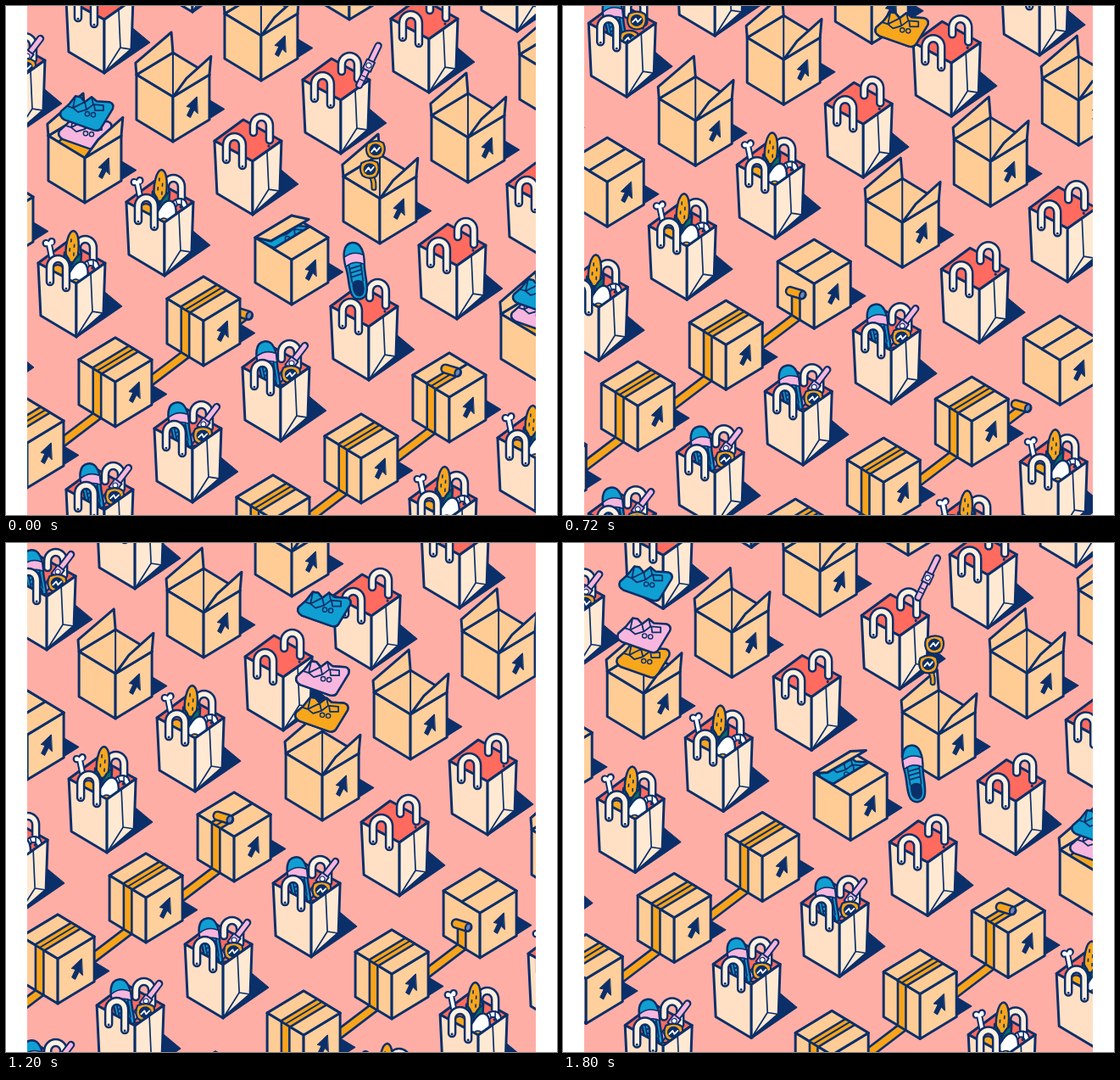
These frames come from a looping animation (650 by 600 pixels, 1840 ms). An HTML page with a canvas:

```html
<!DOCTYPE html>
<html>
<head>
<meta charset="utf-8">
<style>
html,body{margin:0;width:100%;height:100%;overflow:hidden;background:#fff}
canvas{display:block}
</style>
</head>
<body>
<canvas id="c" width="650" height="600"></canvas>
<script>
const g = document.getElementById('c').getContext('2d');
const T = 1840, STEP = [104, -72];
const NAVY = '#0b2f69', PINK = '#f7b6dd', BLUE = '#109fd2', ORANGE = '#f8a61c',
  TAPE = '#f9a31a', TAN = '#ffcc96', CREAM = '#ffe0c4', PALE = '#ffe9d3', RED = '#ff6b5e', GREEN = '#0c6e62';

// Rows along the belt: position at time 0 of item 0 and the time its goods land.
const ROWS = [
  {kind: 'wear', x: 116, y: 79, off: 580},
  {kind: 'box', x: 93, y: 232, off: 0},
  {kind: 'food', x: 291, y: 246, off: 0},
  {kind: 'box', x: 441, y: 280, off: 1280},
  {kind: 'wear', x: 428, y: 441, off: 0},
  {kind: 'box', x: 627, y: 442, off: -43},
  {kind: 'food', x: 625, y: 596, off: -T}
];

function track(keys, t) {
  if (t <= keys[0][0]) return keys[0][1];
  for (let i = 1; i < keys.length; i++) {
    const [t1, v1] = keys[i], [t0, v0] = keys[i - 1];
    if (t < t1) return v0 + (v1 - v0) * (t - t0) / (t1 - t0);
  }
  return keys[keys.length - 1][1];
}

function trace(pts) {
  g.beginPath();
  pts.forEach(p => g.lineTo(p[0], p[1]));
  g.closePath();
}
function poly(pts, fill, w = 3) {
  trace(pts);
  g.fillStyle = fill;
  g.fill();
  if (w) { g.lineWidth = w; g.strokeStyle = NAVY; g.stroke(); }
}
function shape(d, fill, w = 0, color = NAVY) {
  const p = new Path2D(d);
  if (fill) { g.fillStyle = fill; g.fill(p); }
  if (w) { g.lineWidth = w; g.strokeStyle = color; g.stroke(p); }
}
function oval(x, y, rx, ry, fill, w = 0) {
  g.beginPath();
  g.ellipse(x, y, rx, ry, 0, 0, 7);
  if (fill) { g.fillStyle = fill; g.fill(); }
  if (w) { g.lineWidth = w; g.strokeStyle = NAVY; g.stroke(); }
}
function at(x, y, turn, draw) {
  g.save();
  g.translate(x, y);
  g.rotate(turn);
  draw();
  g.restore();
}
const add = (p, q, k = 1) => [p[0] + q[0] * k, p[1] + q[1] * k];
const mix = (p, q, k) => [p[0] + (q[0] - p[0]) * k, p[1] + (q[1] - p[1]) * k];

// ---- goods ----
function shirt(color) {
  shape('M-30-2L-21-10L-13-20L-7-19L-2-13L6-19L12-14L27-13Q33-11 31-5L17 18Q14 22 8 20L-26 8Q-33 4-30-2Z', color, 2.5);
  shape('M-13-20L-16-6L-2-13M-16-6L-22-8M-2-13L0-4L8-10L6-19M-16-6L-10-1L0-4M9-10L20-9L20-3L10-3Z', null, 1.8);
  oval(1, 1, 2.6, 2.6, null, 1.4);
  oval(8, 2, 2.6, 2.6, null, 1.4);
}
function shoe() {
  shape('M0-34C11-34 13-20 11-6C10 4 12 14 10 24C8 36-7 36-9 24C-11 14-9 4-11-6C-13-20-11-34 0-34Z', BLUE, 2.5);
  shape('M-11.5-18Q0-25 11.5-18L11-7Q0-14-11-7Z', PINK, 1.6);
  shape('M-6 13Q0 8 7 13Q9 29 1 30Q-8 29-6 13Z', NAVY);
  shape('M-6-4L6-6M-6 1L6-1M-6 6L6 4M-7-8L-6 12M7-8L7 12', null, 1.8);
}
function glasses() {
  shape('M-6 14Q2 22 1 33', null, 7);
  shape('M-6 14Q2 22 1 33', null, 3, TAPE);
  for (const [x, y] of [[3, -12], [-4, 11]]) at(x, y, -0.1, () => {
    shape('M-9-8Q2-13 10-7Q13 2 7 9Q-2 13-9 7Q-13 0-9-8Z', TAPE, 2.2);
    oval(0, 0, 7.5, 7, NAVY);
    shape('M-5 2L-1-2L1 2L5-2', null, 1.8, '#fff');
  });
}
function watch() {
  shape('M0-26L0 26', null, 9);
  shape('M0-25.5L0 25.5', null, 5, PINK);
  shape('M-2 14L2 14M-2 19L2 19', null, 1.4);
  shape('M-5-6L5-6L5 6L-5 6Z', PINK, 2);
  oval(0, 0, 3, 3, '#fff', 1.2);
}
function egg() {
  shape('M0-19C8-19 12-4 12 5C12 14 7 19 0 19C-7 19-12 14-12 5C-12-4-8-19 0-19Z', '#fff', 2.5);
  oval(0, 9, 6.5, 6.5, ORANGE, 1.6);
}
function corn() {
  shape('M-6 10C-10-8-6-26 0-27C7-26 9-8 6 10Z', ORANGE, 2.5);
  shape('M-2-17L-2-14M2-11L2-8M-3-6L-3-3M2-1L2 2', null, 1.6);
  shape('M-9-1Q-3 6 0 14Q4 4 11-2Q12 16 4 27L-4 27Q-11 14-9-1Z', GREEN, 2.5);
  shape('M0 14L0 24', null, 1.6);
}
function bone() {
  const d = 'M0-8L1 12';
  oval(-3.5, -9, 3.5, 3.5, '#fff', 2.4);
  oval(3.5, -10, 3.5, 3.5, '#fff', 2.4);
  shape(d, null, 8);
  shape(d, null, 4, '#fff');
  oval(-3, -9, 2.6, 2.6, '#fff');
  oval(3, -9, 2.6, 2.6, '#fff');
}
function shrimp() {
  shape('M-9 6Q-9-6 2-7Q11-7 11 4L6 6Q5-1 0 0Q-4 2-4 8Z', '#fff', 2);
  shape('M-3-6L-1 0M4-7L4 0M9 5L14 10M9 5L8 11', null, 1.6);
  oval(-6, 4, 1.6, 1.6, RED);
}
const fruit = () => oval(0, 0, 7, 7, ORANGE, 2.2);

// Each: drawing, fall track, x and turn while falling, x and turn at rest.
const GOODS = {
  wear: [
    [watch, [[-250, -540], [-40, -399], [0, -372], [260, -92]], 0, .45, 13, .65],
    [shoe, [[-400, -520], [-40, -168], [0, -129], [60, -84]], -16, -.12, -14, -.16],
    [glasses, [[-300, -620], [-40, -309], [0, -261], [150, -67]], 5, 0, 8, .1]
  ],
  food: [
    [bone, [[350, -330], [580, -102]], -31, -.15, -31, -.15],
    [corn, [[100, -490], [400, -187], [480, -98]], -10, .32, -5, .06],
    [shrimp, [[420, -340], [650, -84]], 16, 0, 16, 0],
    [fruit, [[430, -330], [600, -78]], -22, 0, -22, 0],
    [egg, [[-20, -520], [400, -102], [440, -70]], 0, 0, 2, .3]
  ]
};
const SHIRTS = [
  [ORANGE, -1, [[-880, -340], [-560, -281], [-400, -257], [-317, -225], [-80, -126], [-40, -93], [0, -70], [200, -55]]],
  [PINK, 0, [[-880, -390], [-560, -336], [-400, -302], [-317, -271], [-80, -169], [-40, -123], [0, -83], [200, -62]]],
  [BLUE, 2, [[-880, -420], [-560, -375], [-400, -348], [-317, -321], [-80, -251], [-40, -185], [0, -106], [200, -79]]]
];

// ---- bag ----
const BAG = {l: [-45, -87], f: [0, -63], r: [34, -87], b: [-11, -112], lb: [-42, -25], rb: [32, -28]};
function handle(d) {
  shape(d, null, 10.5);
  shape(d, null, 5.5, '#fff0df');
}
function bag(kind, age) {
  const {l, f, r, b, lb, rb} = BAG;
  poly([l, b, r, f], RED);
  oval(0, -96, 1.5, 1.8, NAVY);
  oval(19, -81, 1.5, 1.8, NAVY);
  handle('M1-97L1-105A9.5 10 0 0 1 20-105L20-88');
  for (const [draw, keys, x0, a0, x1, a1] of GOODS[kind]) {
    if (age < keys[0][0]) continue;
    const end = keys[keys.length - 1][0];
    const k = track([[end - 90, 0], [end, 1]], age);
    at(x0 + (x1 - x0) * k, track(keys, age), a0 + (a1 - a0) * k, draw);
  }
  poly([l, f, [0, 0], lb], CREAM);
  poly([f, r, rb, [0, 0]], PALE);
  shape('M17-75L19-30L0 0M19-30L32-28', null, 1.7);
  handle('M-31-65L-31-82A9.5 10 0 0 1-12-82L-12-58');
  oval(-31, -64, 1.4, 1.4, NAVY);
  oval(-12, -57, 1.4, 1.4, NAVY);
}

// ---- box ----
const A = [43, -26], B = [-43, -26];
const BOX = {l: [-43, -79], f: [0, -53], r: [43, -79], b: [0, -105]};
const PATH = [[-82, 33], [-21.5, -13], [-21.5, -66], [21.5, -92], [22, -39]];
const ROLL = [[520, 0], [560, .4], [763, .6], [960, .87], [1280, 1.47], [1523, 2], [1760, 2.2],
  [1883, 2.55], [2040, 2.68], [2283, 3], [2360, 4]];

function flap(deg, p, q, inward, shiftP, scaleP) {
  const a = deg * Math.PI / 180, open = deg / 95;
  const v = [inward[0] * Math.cos(a), inward[1] * Math.cos(a) - 23 * Math.sin(a)];
  const vp = add(v.map(n => n * (1 + (scaleP - 1) * open)), [shiftP * open, 0]);
  poly([p, add(p, vp), add(q, v), q], TAN);
}
function roll(p) {
  at(p[0], p[1] - 4, .3, () => {
    shape('M-7 0L7 0', null, 12.5);
    shape('M-7 0L7 0', null, 7.5, TAPE);
    oval(8, 0, 3.2, 4.6, '#6f86b5', 2.2);
  });
}
function strip(p, q, w) {
  poly([add(p, B, -w), add(q, B, -w), add(q, B, w), add(p, B, w)], TAPE, 2.6);
}
function box(age) {
  const {l, f, r, b} = BOX;
  const way = track(ROLL, age), seg = Math.min(3, Math.floor(way));
  const spot = mix(PATH[seg], PATH[seg + 1], way - seg);
  if (way > 3 && way < 4) roll(spot);

  const left = track([[220, 95], [400, 68], [560, 20], [680, 0]], age);
  const right = track([[220, 95], [400, 16], [500, 0]], age);
  const backFlap = () => flap(left, l, b, [21.5, 13], 0, .58);
  poly([l, b, r, f], TAN);
  if (age < 400) shape('M0-105L0-56', null, 2);
  if (left > 50) backFlap();
  if (age > -880 && age < 650) {
    g.save();
    if (age > 120) { trace([l, b, r, f]); g.clip(); }
    for (const [color, x, keys] of SHIRTS)
      at(age > 120 ? x - 8 : x, track(keys, age), 0, () => shirt(color));
    g.restore();
  }
  if (left <= 50) backFlap();
  poly([l, f, [0, 0], B], TAN);
  poly([f, r, A, [0, 0]], '#ffcf9c');
  // Goods still in the air pass in front of the open lid.
  flap(right, f, r, [-21.5, -13], 14, 1);
  if (age > -880 && age < -60) {
    for (const [color, x, keys] of SHIRTS) {
      const y = track(keys, age);
      if (y < -115) at(x, y, 0, () => shirt(color));
    }
  }
  poly([[28, -53], [16, -41.5], [21, -40.5], [16.5, -31], [20.5, -28.5], [25, -37.5], [29, -33.5]], NAVY, 1);

  if (way > 0) {
    strip(PATH[0], way < 1 ? spot : PATH[1], .11);
    if (way > 1) strip(PATH[1], way < 2 ? spot : PATH[2], .11);
    if (way > 2) {
      const end = way < 3 ? spot : PATH[3];
      strip(PATH[2], end, .13);
      shape(`M${PATH[2]}L${end}`, null, 2);
    }
    if (way < 3) roll(spot);
  }
}

// ---- scene ----
function each(t, draw) {
  for (const row of ROWS) {
    for (let k = 7; k >= -7; k--) {
      const u = k - t / T, x = row.x + u * STEP[0], y = row.y + u * STEP[1];
      if (x < -90 || x > 760 || y < -20 || y > 1000) continue;
      at(x, y, 0, () => draw(row.kind, t - row.off - k * T));
    }
  }
}
function shadow(kind) {
  poly(kind === 'box' ? [[0, 0], [61, -38.5], [18, -64.5], B] : [[0, 1], [54, -36], [30, -56], [-30, -30]], NAVY, 1);
}
function paint(t) {
  g.fillStyle = '#fff';
  g.fillRect(0, 0, 650, 600);
  g.save();
  g.beginPath();
  g.rect(25, 0, 600, 600);
  g.clip();
  g.fillStyle = '#ffaea6';
  g.fillRect(25, 0, 600, 600);
  g.lineJoin = g.lineCap = 'round';
  each(t, shadow);
  each(t, (kind, age) => kind === 'box' ? box(age) : bag(kind, age));
  g.restore();
}

const start = performance.now();
function frame() {
  paint((performance.now() - start) % T);
  requestAnimationFrame(frame);
}
frame();
</script>
</body>
</html>
```
